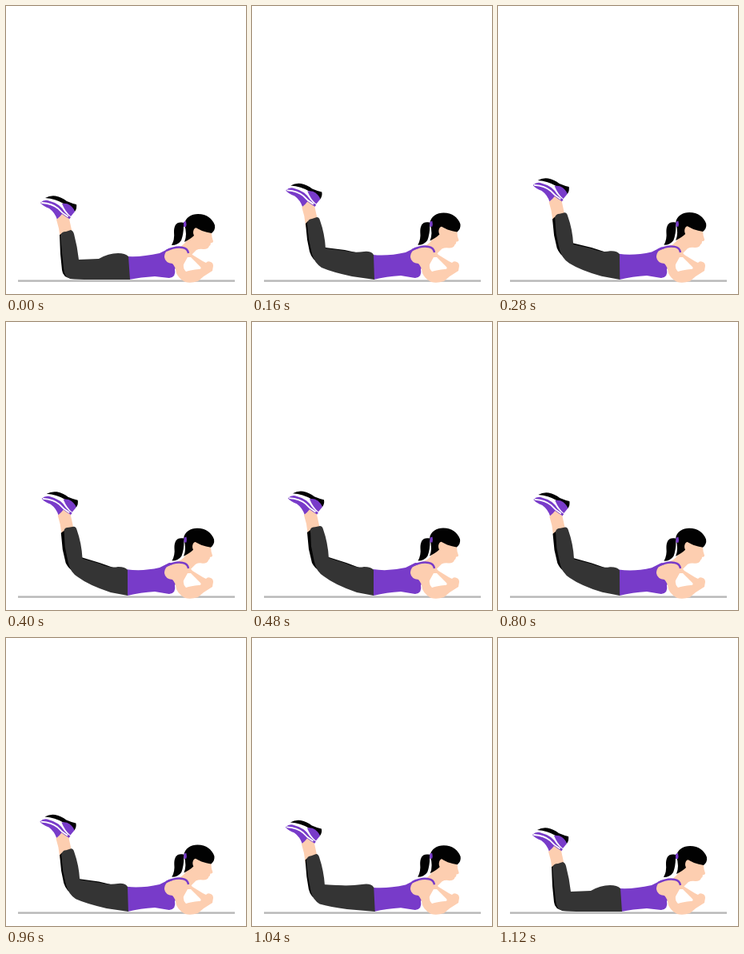
Recreate the animation shown at these times as an HTML page. Size 300 by 360 pixels, loop 1160 ms.

```html
<!DOCTYPE html>
<html lang="en">
<head>
<meta charset="utf-8">
<title>Prone leg lift</title>
<style>
  html, body { margin: 0; width: 100%; height: 100%; overflow: hidden; background: #fff; }
  svg { display: block; width: 300px; height: 360px; }
  .skin { fill: #fdceb0; }
  .purple { fill: #783bc9; }
  .black { fill: #020202; }
  .cloth { fill: #343434; }
  .line { fill: none; stroke: #fff; stroke-linecap: round; }
</style>
</head>
<body>
<svg viewBox="0 0 300 360">
  <rect x="15" y="342.4" width="271" height="2.4" fill="#b7b7b7"/>

  <g id="foot">
    <path class="black" d="M49 240Q55 236.5 62 237.5Q70 239 76 244Q83 247 88 248Q89 253 86 257Q80 248 72 247Q62 241 49 240Z"/>
    <path class="purple" d="M70 247Q76 246 80 249Q85 253 86 257L81 263Q74 257 70 247Z"/>
    <path class="purple" d="M43 246Q47 242 52 243Q60 245 66 249Q70 252 73 257Q77 262 81 264L78 268L64 267Q61 258 54 253Q46 250 43 246Z"/>
    <path class="line" stroke-width="1.8" d="M45 246Q58 247 65 253Q70 259 77 263"/>
    <path class="skin" d="M63 267Q68 263 70 260Q74 263 79 266L84 289L68 292L66 278Z"/>
  </g>

  <path id="farLeg" class="black"/>
  <path id="torso" class="purple"/>
  <path id="nearLeg" class="cloth"/>

  <g id="head">
    <path class="skin" d="M228 279Q238 267 253 274L257 284Q257 289 259 294Q259 296 256 296Q256 299 254 300Q253 304 247 304Q242 303 238 305L230 313L208 304Q223 301 226 292Z"/>
    <path class="black" d="M223 273C224 264 232 260 240 260C251 260 258 266 261 274Q262 280 257 284Q251 283 245 281L239 278Q237 276 235 279Q233 283 235 287Q231 291 223 295Q227 286 223 273Z"/>
    <g id="tail">
      <path class="black" d="M222 271C213 269 210 274 210 283Q211 292 207 299Q215 299 219 293Q222 285 222 275Z"/>
      <path class="purple" d="M222 270L225 269Q226 273 225 276L222 276Z"/>
    </g>
  </g>

  <path class="skin" fill-rule="evenodd" d="M201 306Q213 299 227 304L233 311L246 319L250 321Q252 318 256 320Q259 321 259 325L258 331L247 338L240 344Q231 347 224 345Q216 341 213 334Q212 326 208 322Q199 321 198 314Q198 309 201 306ZM227 314L231 314L243 326Q245 329 241 329Q231 330 225 332Q221 328 222 323Z"/>
  <path id="strap" fill="none" stroke="#783bc9" stroke-width="2.4"/>
</svg>

<script>
const LOOP = 1160, STEP = 40;
const part = id => document.getElementById(id);

// Each shape has a low, a middle (lift 0.6) and a high pose.
const shapes = {
  nearLeg: [
    "M68 287Q69 282 75 282L81 280Q84 281 85 285Q89 300 91 317L116 316Q128 309 140 309Q149 309 153 313L155 342L105 342Q90 342 80 341Q73 339 72 328L70 308Z",
    "M69 272Q70 266 75 266L81 264Q84 264 85 268Q91 285 92 303L116 306Q128 309 140 307Q149 306 152 311L153 342L125 338Q101 333 87 327Q78 321 75 310L71 292Z",
    "M73 259Q74 256 79 256L85 255Q88 255 89 259Q95 276 96 295L118 302Q130 308 140 306Q149 306 152 310L152 342L131 338Q104 329 90 318Q81 313 78 300L74 280Z"
  ],
  farLeg: [
    "M67 286L71 284L76 315L90 322L116 320L134 318L128 328L100 335L82 340Q71 340 70 330L68 310Z",
    "M67 272L70 269L77 295L92 302L116 305L134 309L128 318L98 322L84 322Q75 317 72 307L69 292Z",
    "M69 263L73 260L80 285L96 294L118 301L134 307L128 316L100 315L84 311Q78 307 75 301L71 284Z"
  ],
  torso: [
    "M152 313Q170 314 192 309L204 303L226 305L216 322L211 329Q213 339 204 340L186 338Q168 339 154 342Z",
    "M151 311Q170 313 192 308L204 302L226 304L216 322L211 329Q213 339 204 340L186 337Q168 338 152 342Z",
    "M151 309Q170 312 192 307L204 301L226 304L216 322L211 329Q213 339 204 340L186 337Q168 338 152 342Z"
  ],
  strap: [
    "M200 306Q212 300 221 302Q227 303 228 309",
    "M200 305Q212 299 221 301Q227 302 228 308",
    "M200 305Q212 299 221 301Q227 302 228 308"
  ]
};

// Quadratic curve through the values at lift 0, 0.6 and 1.
function blend(a, b, c, p) {
  return a * (p - 0.6) * (p - 1) / 0.6 - b * p * (p - 1) / 0.24 + c * p * (p - 0.6) / 0.4;
}

function morph([low, mid, high], p) {
  const m = mid.match(/\d+/g), h = high.match(/\d+/g);
  let i = 0;
  return low.replace(/\d+/g, n => {
    const v = blend(+n, +m[i], +h[i], p);
    i++;
    return v.toFixed(2) + " ";
  });
}

// Fast rise, short hold, mirrored fall.
function liftAt(t) {
  if (t < 560) return 1 - Math.pow(1 - t / 560, 2.7);
  if (t <= 600) return 1;
  return 1 - Math.pow(Math.min(1, (t - 600) / 520), 2.7);
}

function move(id, x, y) {
  part(id).setAttribute("transform", `translate(${x} ${y})`);
}

function draw(now) {
  const t = Math.floor((now % LOOP) / STEP) * STEP;
  const p = liftAt(t);
  for (const id in shapes) part(id).setAttribute("d", morph(shapes[id], p));
  move("foot", blend(0, -0.7, 2, p), blend(0, -15.7, -26, p));
  move("head", -p, -2.4 * p);
  move("tail", 1.5 * p, 2 * p);
}

let start;
function tick(now) {
  start ??= now;
  draw(now - start);
  requestAnimationFrame(tick);
}
draw(0);
requestAnimationFrame(tick);
</script>
</body>
</html>
```
